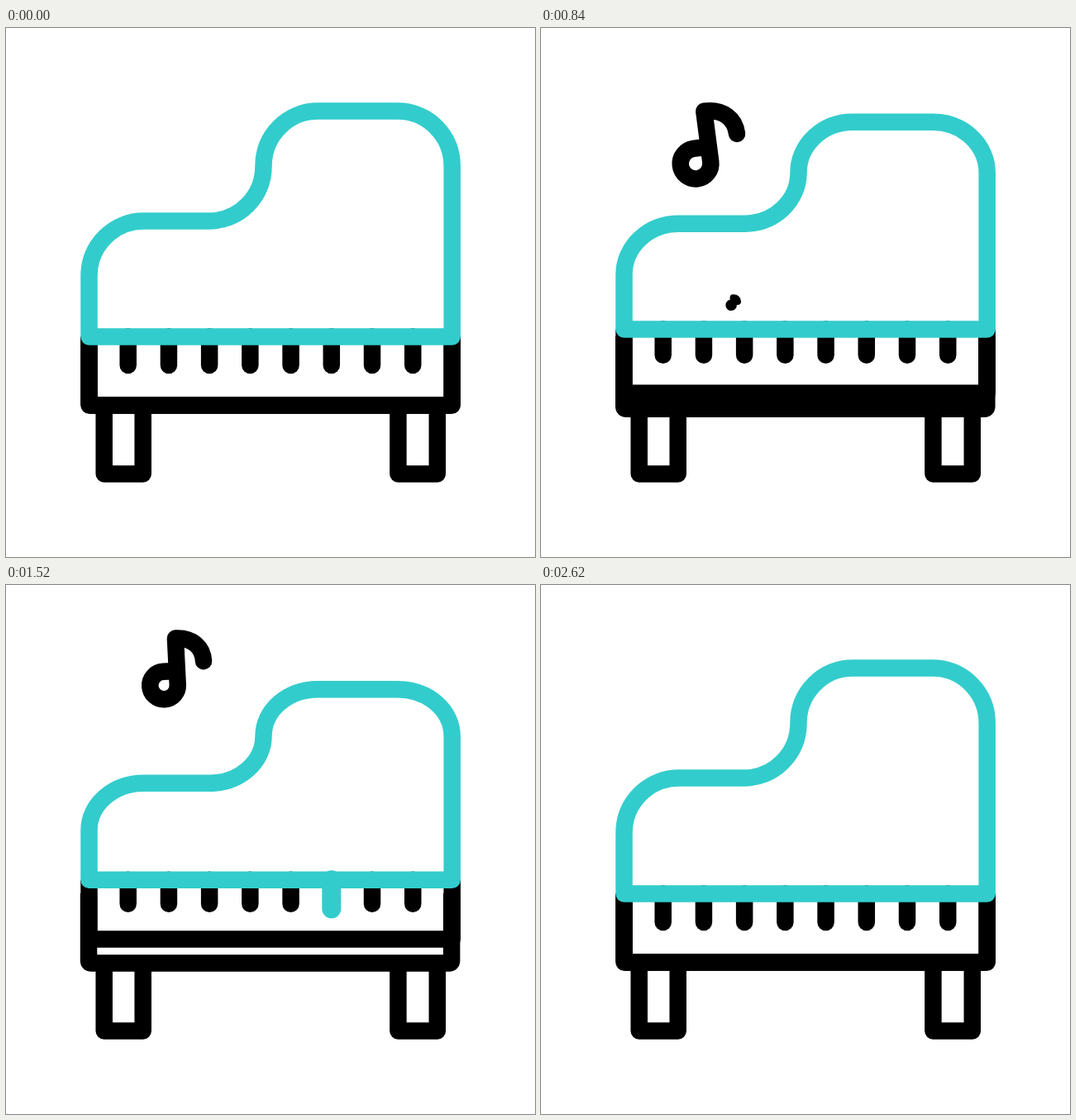
An HTML page that plays this animation: 640 px wide and 640 px high, repeating every 3000 ms.

```html
<!DOCTYPE html>
<html lang="en">
<head>
<meta charset="utf-8">
<title>Piano</title>
<style>
  html, body { margin: 0; width: 100%; height: 100%; overflow: hidden; background: #fff; }
  svg { display: block; width: 100vw; height: 100vh; }
  path { fill: none; stroke: #000; stroke-width: 20.5; stroke-linejoin: round; }
  .round { stroke-linecap: round; }
  #lid { stroke: #33cccc; }
</style>
</head>
<body>
<svg id="stage" viewBox="0 0 640 640">
  <path d="M118.7 460V539.6H165.7V460M474.4 460V539.6H521.8V460"/>
  <path id="base"/>
  <path id="box"/>
  <g id="keys"></g>
  <path id="lid"/>
  <g id="notes"></g>
</svg>
<script>
const LOOP = 3000, TEAL = '#33cccc';
const $ = id => document.getElementById(id);
const lerp = (a, b, p) => a + (b - a) * p;

// Poses: lid top, shelf, lid bottom, key end, box bottom, base bottom, base left, base right
const rest = [100.5, 233.5, 373.5, 408, 456.5, 456.5, 100.5, 539.7];
const tall = [89.5, 230.6, 379.7, 415, 467.5, 467.3, 100.5, 539.7];
const flat = [128.1, 240.3, 355.4, 384.1, 426.4, 457, 100, 539.1];

function bezier(x1, x2) {
  return x => {
    let lo = 0, hi = 1, s = 0.5;
    for (let i = 0; i < 24; i++) {
      s = (lo + hi) / 2;
      const v = 3 * (1 - s) * s * ((1 - s) * x1 + s * x2) + s * s * s;
      if (v < x) lo = s; else hi = s;
    }
    return s * s * (3 - 2 * s);
  };
}

const smooth = bezier(0.333, 0.667);
const moves = [
  [200, 380, rest, tall, smooth],
  [380, 2000, tall, flat, bezier(0, 0.197)],
  [2000, 2380, flat, tall, bezier(0.33, 0.58)],
  [2380, 2630, tall, rest, smooth]
];

function poseAt(t) {
  const m = moves.find(m => t >= m[0] && t < m[1]);
  if (!m) return rest;
  const p = m[4]((t - m[0]) / (m[1] - m[0]));
  return m[2].map((v, i) => lerp(v, m[3][i], p));
}

// Key presses: key, from, to
const presses = [[3, 900, 1150], [5, 1400, 1650]];

// Note flight: time, x, y, size, tilt
const flight = [
  [540, 165, 345, 0, 0],
  [660, 171.3, 272, 1, -8.6],
  [735, 183, 207, 1, -12],
  [945, 191, 122, 0.84, -3],
  [1020, 191.3, 86, 0.69, 6],
  [1050, 191.6, 77, 0.58, 8],
  [1110, 192, 68, 0, 10]
];
// Note launches: delay, x offset
const launches = [[0, 0], [285, 64.3], [575, 0]];

function flightAt(t) {
  const i = flight.findIndex((f, n) => n && t >= flight[n - 1][0] && t < f[0]);
  if (i < 0) return null;
  const a = flight[i - 1], b = flight[i], p = (t - a[0]) / (b[0] - a[0]);
  return a.map((v, k) => lerp(v, b[k], p));
}

function addPath(parent) {
  const el = document.createElementNS('http://www.w3.org/2000/svg', 'path');
  el.setAttribute('class', 'round');
  return parent.appendChild(el);
}

const keys = Array.from({ length: 8 }, () => addPath($('keys')));
const notes = launches.map(() => addPath($('notes')));

function notePath(s) {
  const n = v => (v * s).toFixed(2);
  return `M${n(20)} ${n(-20)}H0A${n(20)} ${n(20)} 0 1 0 ${n(20)} 0V${n(-67)}` +
    `C${n(45)} ${n(-67)} ${n(59)} ${n(-52)} ${n(59)} ${n(-32)}`;
}

function draw(t) {
  const [top, shelf, bottom, keyEnd, box, base, left, right] = poseAt(t);
  const ry = (shelf - top) / 2;

  $('lid').setAttribute('d',
    `M100.5 ${bottom}V${shelf + ry}A66 ${ry} 0 0 1 166.5 ${shelf}H246` +
    `A65.5 ${ry} 0 0 0 311.5 ${shelf - ry}A65.5 ${ry} 0 0 1 377 ${top}H474` +
    `A65.7 ${ry} 0 0 1 539.7 ${top + ry}V${bottom}Z`);
  $('box').setAttribute('d', `M100.5 ${bottom}V${box}H539.7V${bottom}`);
  $('base').setAttribute('d',
    `M${left} 373V${base - 3}q0 3 3 3H${right - 3}q3 0 3 -3V373`);

  keys.forEach((key, i) => {
    const x = 147.7 + i * 49.22;
    const on = presses.some(([k, from, to]) => k === i && t >= from && t < to);
    key.setAttribute('d', `M${x} ${bottom}V${keyEnd + (on ? 6.2 : 0)}`);
    key.style.stroke = on ? TEAL : '#000';
    key.style.strokeWidth = on ? 23 : 20.5;
  });

  notes.forEach((note, i) => {
    const [delay, dx] = launches[i], f = flightAt(t - delay);
    note.style.display = f && f[3] > 0.02 ? '' : 'none';
    if (!f) return;
    const [, x, y, size, tilt] = f;
    note.setAttribute('d', notePath(size));
    note.setAttribute('transform', `translate(${x + dx} ${y}) rotate(${tilt})`);
    note.style.strokeWidth = 20.5 * Math.min(1, size * 3);
  });
}

const start = performance.now();
function tick() {
  draw((performance.now() - start) % LOOP);
  requestAnimationFrame(tick);
}
tick();
</script>
</body>
</html>
```
